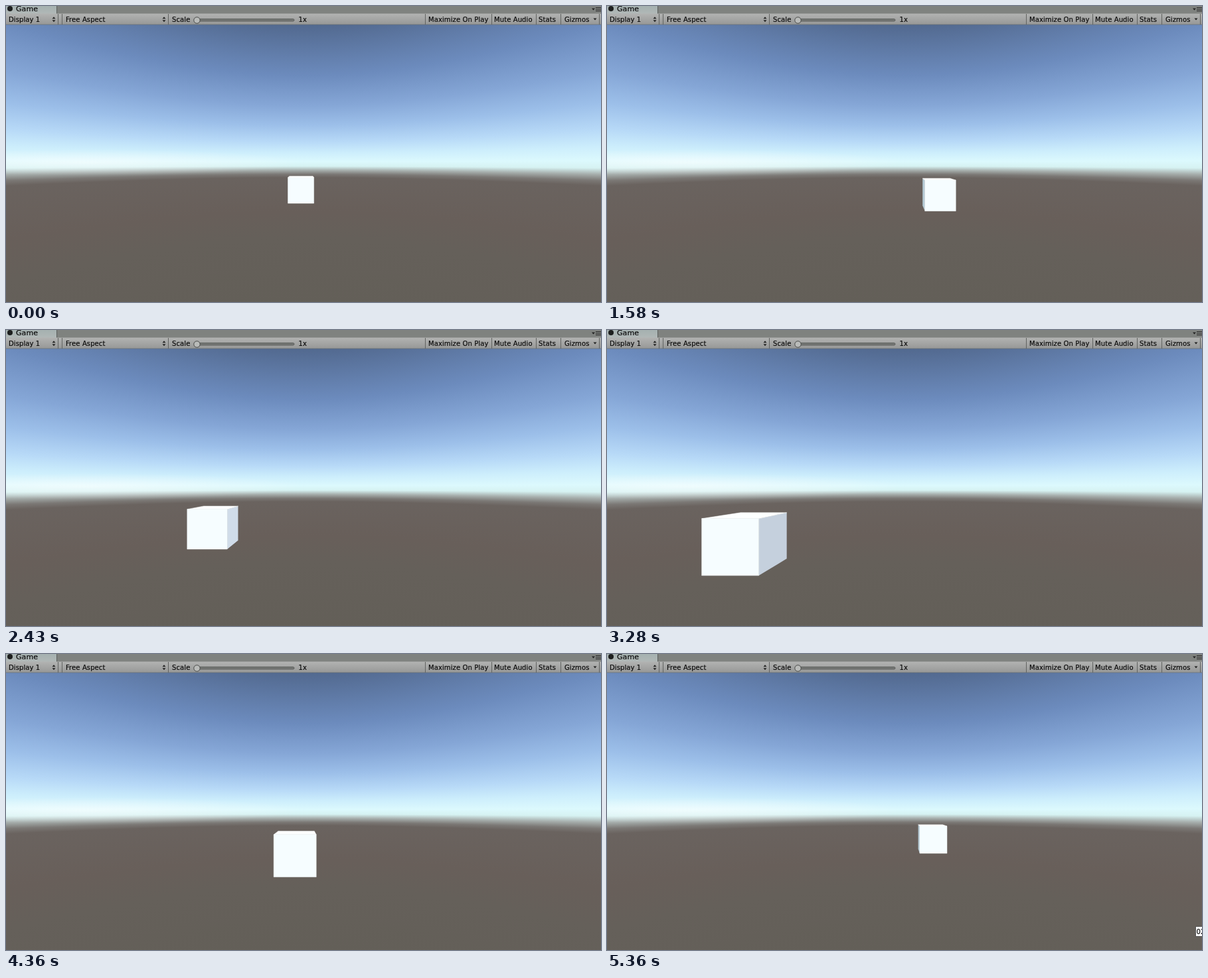
These frames come from a looping animation (896x447 px, 5440 ms). An HTML page with a canvas:

```html
<!DOCTYPE html>
<html lang="en">
<head>
<meta charset="utf-8">
<title>Game view</title>
<style>
  html, body { margin: 0; width: 100%; height: 100%; overflow: hidden; background: #635f58; }
  canvas, svg { position: absolute; left: 0; top: 0; width: 896px; height: 447px; }
  text { font: 10px "DejaVu Sans", sans-serif; fill: #0c0c0c; stroke: #0c0c0c; stroke-width: .2; letter-spacing: .1px; }
</style>
</head>
<body>
<canvas id="sky" width="896" height="447"></canvas>
<svg viewBox="0 0 896 447">
  <defs>
    <linearGradient id="bar" x2="0" y2="1">
      <stop stop-color="#b2b3b2"/><stop offset="1" stop-color="#979897"/>
    </linearGradient>
    <linearGradient id="tab" x2="0" y2="1">
      <stop stop-color="#a5b1b0"/><stop offset="1" stop-color="#b1b8b7"/>
    </linearGradient>
  </defs>

  <g id="cube" stroke-width=".5" stroke-linejoin="round">
    <path id="side"/>
    <path id="top" fill="#fdffff" stroke="#fdffff"/>
    <path id="front" fill="#f6fdff" stroke="#f6fdff"/>
  </g>

  <rect width="896" height="12" fill="#7f827f"/>
  <rect width="76" height="12" fill="url(#tab)"/>
  <path d="M76.5 0V12" stroke="#5c5f5d"/>
  <rect y="11.5" width="896" height="16.5" fill="url(#bar)"/>
  <path d="M0 28H896" stroke="#6d7274" stroke-width=".8"/>
  <path id="rules" stroke="#616361"/>
  <circle cx="6" cy="4" r="4" fill="#1d1f1e"/>
  <path d="M882 3.5h5l-2.500 3z" fill="#222"/>
  <path d="M888 2.500h8M888 5h8M888 7.500h8" stroke="#2a2a2a"/>
  <path d="M69.500 19.300l2.500-3 2.500 3zM69.500 21.300l2.500 3 2.500-3zM235.500 19.300l2.500-3 2.500 3zM235.500 21.300l2.500 3 2.500-3zM884.500 18.500h5l-2.500 3z" fill="#222"/>
  <rect x="290" y="19.500" width="144" height="3.500" rx="1.700" fill="#747674" stroke="#555755" stroke-width=".8"/>
  <circle cx="287.500" cy="21.500" r="4.700" fill="#b9bbb9" stroke="#454745"/>
  <g id="labels"></g>

  <g id="tip">
    <rect x="886.500" y="411.500" width="40" height="15" fill="#fff" stroke="#555"/>
    <text x="887.500" y="423">02</text>
  </g>
</svg>
<script>
const $ = id => document.getElementById(id);
const LOOP = 5440, CX = 448, CY = 237.5, FOCAL = 363;

// Sky colours by height on the centre column; every column shares the same elevations.
const SKY = [
  [28, '#52698f'], [105, '#6c8bbd'], [150, '#85a6d6'], [180, '#9cbfe9'],
  [205, '#b7d9f7'], [222, '#cdeefc'], [235, '#dcf9fd'], [242, '#d6f2f2'],
  [248, '#a7afad'], [254, '#7b7875'], [259, '#6a635f'], [310, '#685f5a'],
  [350, '#65605a'], [447, '#635f58']
];

function paintSky() {
  const c = $('sky').getContext('2d');
  for (let x = 0; x < 896; x += 2) {
    const scale = Math.hypot(x + 1 - CX, FOCAL) / FOCAL;
    const yOf = y => CY + (y - CY) * scale;
    const y0 = yOf(28), y1 = yOf(447);
    const g = c.createLinearGradient(0, y0, 0, y1);
    for (const [y, col] of SKY) g.addColorStop((yOf(y) - y0) / (y1 - y0), col);
    c.fillStyle = g;
    c.fillRect(x, 0, 2, 447);
  }
  // soft glow low on the left
  c.save();
  c.translate(120, 236);
  c.scale(1, .06);
  const glow = c.createRadialGradient(0, 0, 0, 0, 0, 330);
  glow.addColorStop(0, 'rgba(255,255,255,.55)');
  glow.addColorStop(1, 'rgba(255,255,255,0)');
  c.fillStyle = glow;
  c.fillRect(-330, -330, 660, 660);
  c.restore();
}

function buildBar() {
  $('rules').setAttribute('d', [78, 84, 244, 631, 731, 798, 835, 893]
    .map(x => `M${x + .5} 12V28`).join(''));
  const items = [['Display 1', 4], ['Free Aspect', 90], ['Scale', 250], ['1x', 440.5],
    ['Maximize On Play', 636], ['Mute Audio', 735], ['Stats', 802], ['Gizmos', 841]];
  $('labels').innerHTML = '<text x="15" y="8" style="font-size:11px">Game</text>' +
    items.map(([s, x]) => `<text x="${x}" y="24">${s}</text>`).join('');
}

// Cube path: time, sideways position, distance of the front face
const PATH = [
  [0, -.1, 9.3], [240, -.1, 9.3], [560, -.35, 7.9], [820, .466, 8.25],
  [1260, 1.25, 7.7], [1580, 1.16, 7.8], [1820, 1.05, 6.1], [2040, .44, 5],
  [2430, -2.405, 6.02], [2510, -2.57, 6.05], [2740, -2.86, 6.1], [3280, -3.05, 4.22],
  [3355, -3, 4.13], [3430, -2.85, 4.5], [3900, -1.5, 5.3], [4360, -.2, 5.67],
  [5280, 1.06, 8.85], [5440, 1.06, 8.85]
];

// Bursts of evenly spaced updates: first, last, count
const BURSTS = [
  [240, 730, 7], [820, 1340, 8], [1430, 1970, 8], [2040, 2510, 7], [2660, 2740, 2],
  [2890, 3430, 8], [3520, 4050, 8], [4130, 4670, 8], [4760, 5280, 8], [5360, 5360, 1]
];
const TICKS = [0];
for (const [a, b, n] of BURSTS)
  for (let i = 0; i < n; i++)
    TICKS.push(Math.round((a + (n > 1 ? (b - a) * i / (n - 1) : 0)) / 10) * 10);

const snap = t => TICKS.reduce((last, k) => k <= t ? k : last, 0);

// Monotone cubic interpolation of one column of PATH
function slope(i, k) {
  const p = PATH[i - 1], q = PATH[i], r = PATH[i + 1];
  if (!p || !r) return 0;
  const a = (q[k] - p[k]) / (q[0] - p[0]), b = (r[k] - q[k]) / (r[0] - q[0]);
  return a * b <= 0 ? 0 : 2 * a * b / (a + b);
}
function at(t, k) {
  let i = 0;
  while (i < PATH.length - 2 && t >= PATH[i + 1][0]) i++;
  const p = PATH[i], q = PATH[i + 1], h = q[0] - p[0], u = (t - p[0]) / h, v = 1 - u;
  return p[k] * (1 + 2 * u) * v * v + slope(i, k) * h * u * v * v
       + q[k] * u * u * (3 - 2 * u) - slope(i + 1, k) * h * u * u * v;
}

function project(x, y, z) {
  const s = FOCAL / z;
  return (CX + x * s).toFixed(2) + ' ' + (CY + y * s).toFixed(2);
}
const face = (id, pts) =>
  $(id).setAttribute('d', 'M' + pts.map(p => project(...p)).join('L') + 'Z');

function draw(time) {
  const t = snap(time), x = at(t, 1), z = at(t, 2);
  const l = x - .5, r = x + .5, top = .55, low = 1.55, back = z + 1;
  face('front', [[l, top, z], [r, top, z], [r, low, z], [l, low, z]]);
  face('top', [[l, top, z], [l, top, back], [r, top, back], [r, top, z]]);
  const edge = l > 0 ? l : r, col = l > 0 ? '#b5cbd6' : z < 5 ? '#c5d0dd' : '#d0dce9';
  face('side', [[edge, top, z], [edge, top, back], [edge, low, back], [edge, low, z]]);
  $('side').setAttribute('fill', col);
  $('side').setAttribute('visibility', l > 0 || r < 0 ? 'visible' : 'hidden');
  $('tip').setAttribute('visibility', t >= 4590 ? 'visible' : 'hidden');
}

paintSky();
buildBar();
const start = performance.now();
function loop() {
  draw((performance.now() - start) % LOOP);
  requestAnimationFrame(loop);
}
loop();
</script>
</body>
</html>
```
